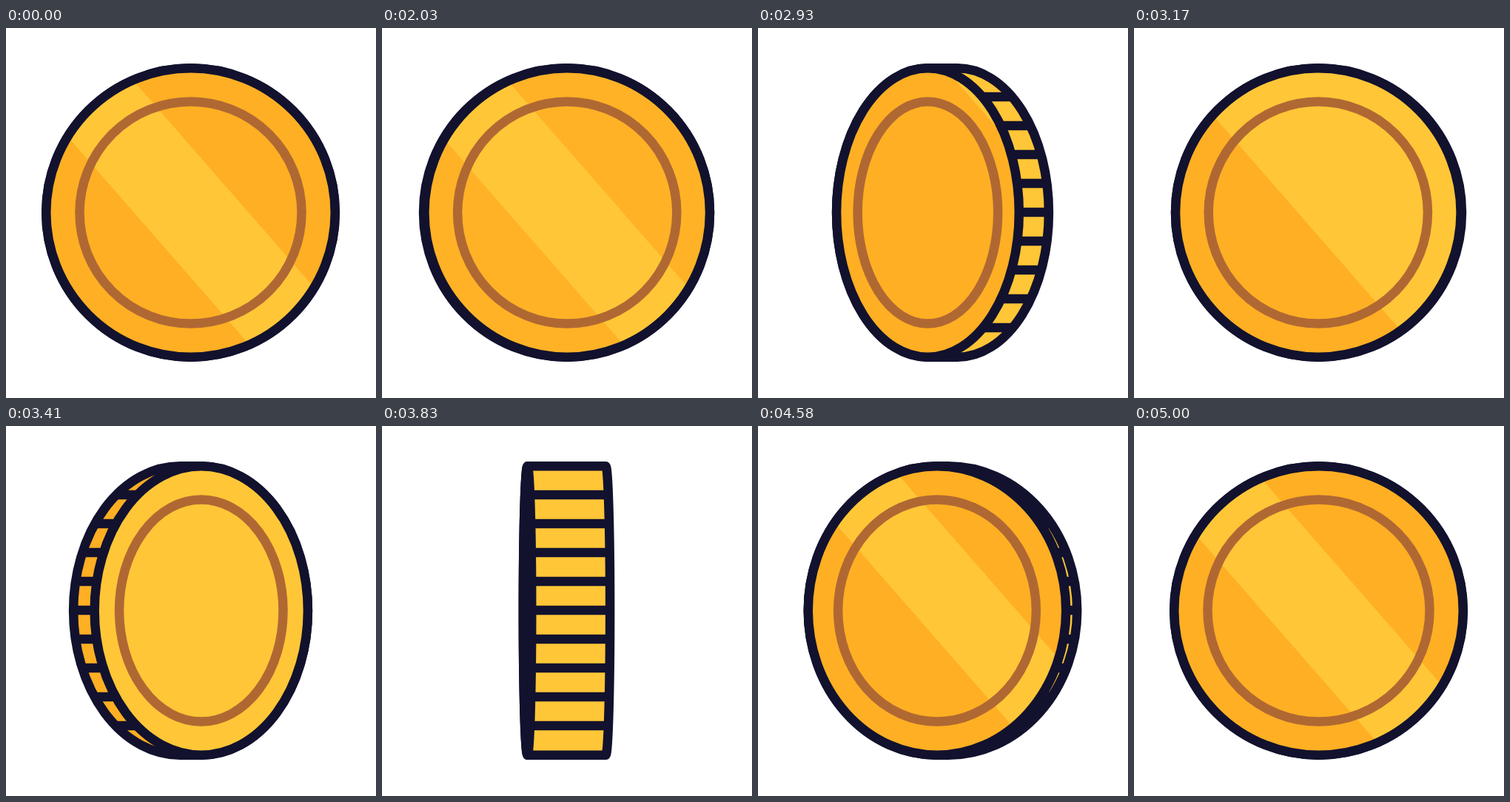
These frames come from a looping animation (500 by 500 pixels, 5030 ms). An HTML page with a canvas:

```html
<!DOCTYPE html>
<html lang="en">
<head>
<meta charset="utf-8">
<title>Spinning coin</title>
<style>
  html, body { margin: 0; width: 100%; height: 100%; overflow: hidden; background: #fff; }
  canvas { display: block; width: 500px; height: 500px; }
</style>
</head>
<body>
<canvas id="stage" width="500" height="500"></canvas>
<script>
const ctx = document.getElementById('stage').getContext('2d');

const LOOP = 5030, HOLD = 2000, STEP = 30;
const C = 249.5, R = 195.25, RING = 150, LINE = 12.5, DEPTH = 109;
const SLOPE = 1.145, RIB_GAP = 39;
const INK = '#12122e', BROWN = '#b06833';
const DARK = [255, 175, 35], LIGHT = [255, 198, 55];

const clamp = v => Math.min(1, Math.max(0, v));
const mix = k => `rgb(${DARK.map((d, i) => Math.round(d + (LIGHT[i] - d) * clamp(k)))})`;

// Bezier ease from rest: (lead, 0) to (5/6, 5/6), solved by bisection.
function ease(x, lead) {
  let lo = 0, hi = 1;
  for (let i = 0; i < 24; i++) {
    const s = (lo + hi) / 2, q = 1 - s;
    if (3 * lead * s * q * q + 2.5 * s * s * q + s ** 3 < x) lo = s; else hi = s;
  }
  return 2.5 * lo * lo * (1 - lo) + lo ** 3;
}

// turn: 0 = face on, 1 = edge on; side: direction the face leans to.
// left / right: where the shine borders cross the middle line.
function pose(ms) {
  if (ms < 600) {
    const turn = ease(ms / 600, 0.2);
    return { turn, edge: turn, side: 1, left: 173 - 200 * turn, right: 328 - 200 * turn,
             shade: ms / 240, rim: (turn - 0.45) / 0.55 };
  }
  if (ms < 1800) {
    const off = Math.abs(ms - 1200) / 600, turn = ease(off, 0.2), coming = ms < 1200;
    return { turn, edge: turn, side: coming ? -1 : 1, left: 423 - 0.84 * (ms - 930), right: 2000,
             shade: 0, rim: coming ? 1 : (turn - 0.45) / 0.55 };
  }
  const rest = clamp((3000 - ms) / 1200), turn = ease(rest, 0.6);
  return { turn, edge: ease(rest, 0.5), side: -1, left: 173 + 320 * turn, right: 328 + 203 * turn,
           shade: 0, rim: 1 };
}

function oval(x, rx, ry) {
  ctx.beginPath();
  ctx.ellipse(x, C, rx, ry, 0, 0, 2 * Math.PI);
}

function stroke(color) {
  ctx.strokeStyle = color;
  ctx.stroke();
}

// Fills everything on one side of a slanted border.
function shadeBeyond(x, far) {
  const slant = 300 / SLOPE;
  ctx.beginPath();
  ctx.moveTo(x - slant, C - 300);
  ctx.lineTo(x + slant, C + 300);
  ctx.lineTo(far, C + 300);
  ctx.lineTo(far, C - 300);
  ctx.fill();
}

function drawRim(p, rx, half) {
  ctx.beginPath();
  ctx.ellipse(C + half, C, rx, R, 0, -Math.PI / 2, Math.PI / 2);
  ctx.ellipse(C - half, C, rx, R, 0, Math.PI / 2, 1.5 * Math.PI);
  ctx.closePath();
  ctx.fillStyle = mix(p.rim);
  ctx.fill();
  stroke(INK);
  ctx.beginPath();
  for (let i = -4; i <= 4; i++) {
    const dy = i * RIB_GAP, bulge = -p.side * rx * Math.sqrt(1 - (dy / R) ** 2);
    ctx.moveTo(C - half + bulge, C - 0.5 + dy);
    ctx.lineTo(C + half + bulge, C - 0.5 + dy);
  }
  stroke(INK);
}

function drawFace(p, rx, x) {
  ctx.save();
  oval(x, rx, R);
  ctx.clip();
  ctx.fillStyle = mix(1);
  ctx.fillRect(0, 0, 500, 500);
  ctx.fillStyle = mix(p.shade);
  shadeBeyond(p.left, -2500);
  shadeBeyond(p.right, 2500);
  oval(x, rx * RING / R, RING);
  stroke(BROWN);
  ctx.restore();
  oval(x, rx, R);
  stroke(INK);
}

function draw(ms) {
  const p = pose(ms);
  const rx = Math.max(0.01, R * (1 - p.turn)), half = DEPTH * p.edge / 2;
  ctx.fillStyle = '#fff';
  ctx.fillRect(0, 0, 500, 500);
  ctx.lineWidth = LINE;
  drawRim(p, rx, half);
  drawFace(p, rx, C + p.side * half);
}

const start = performance.now();
function tick() {
  const t = (performance.now() - start) % LOOP;
  draw(Math.max(0, Math.floor((t - HOLD) / STEP) * STEP));
  requestAnimationFrame(tick);
}
tick();
</script>
</body>
</html>
```
